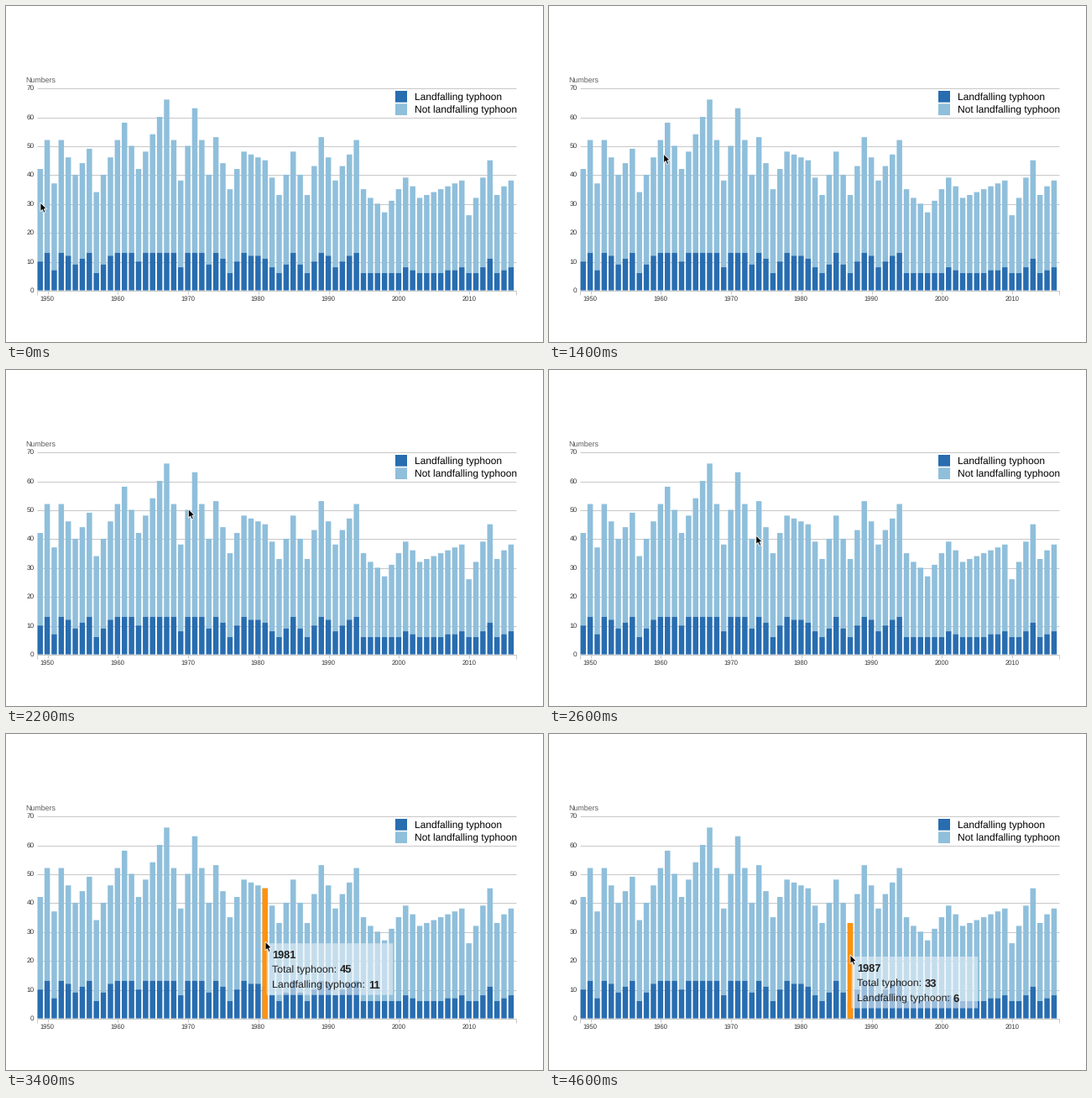
These frames come from a looping animation (640x400 px, 4800 ms). A matplotlib script:

```python
import matplotlib.pyplot as plt
import numpy as np
from matplotlib.animation import FuncAnimation
from matplotlib.patches import Polygon, Rectangle

W, H, DPI = 640, 400, 100
FRAMES, STEP_MS = 24, 200
DARK, LIGHT, HOT = "#286db0", "#8fbfdb", "#ff9210"
BASE, UNIT = 338.6, 3.443     # y of zero, pixels per typhoon
FIRST, LAST, PITCH, BAR = 1949, 2016, 8.376, 6.5

# Turning points of the yearly totals
turns = np.array([
    (1949, 42), (1950, 52), (1951, 37), (1952, 52), (1954, 40), (1956, 49),
    (1957, 34), (1961, 58), (1963, 42), (1967, 66), (1969, 38), (1971, 63),
    (1973, 40), (1974, 53), (1976, 35), (1978, 48), (1981, 45), (1983, 33),
    (1985, 48), (1987, 33), (1989, 53), (1991, 38), (1994, 52), (1995, 35),
    (1998, 27), (2001, 39), (2003, 32), (2009, 38), (2010, 26), (2013, 45),
    (2014, 33), (2016, 38)])
years = np.arange(FIRST, LAST + 1)
total = np.rint(np.interp(years, *turns.T)).astype(int)
# Landfalls rise with the total and level off at both ends
landed = np.clip(0.47 * total - 9.5, 6, 13).astype(int)

# Pointer waypoints: time in ms, x, y
path = np.array([
    (0, 41, 234), (400, 43, 235), (600, 53.8, 238), (800, 60, 239.5),
    (1800, 187.9, 134), (2600, 246.8, 197), (3000, 288.4, 246),
    (4000, 340, 249), (4200, 342.5, 252), (4600, 359, 263)])

plt.rcParams.update({"font.family": "Liberation Sans", "text.hinting": "none"})
fig = plt.figure(figsize=(W / DPI, H / DPI), dpi=DPI, facecolor="white")
ax = fig.add_axes([0, 0, 1, 1])
ax.set(xlim=(0, W), ylim=(H, 0))
ax.axis("off")


def year_x(year):
    return 49.1 + (year - 1950) * PITCH


def value_y(value):
    return BASE - value * UNIT


def label(x, y, text, px, **kw):
    kw.setdefault("color", "#222222")
    return ax.text(x, y, text, fontsize=px * 72 / DPI, va="baseline", **kw)


def rect(x, y, w, h, color, **kw):
    return ax.add_patch(
        Rectangle((x, y), w, h, fc=color, lw=0, snap=False, **kw))


def line(xs, ys, color="#c8c8c8"):
    ax.plot(xs, ys, color=color, lw=0.72, zorder=0, solid_capstyle="butt")


def draw_axes():
    label(23.5, 91, "Numbers", 8.9, color="#5c5c5c")
    for v in range(0, 71, 10):
        y = round(value_y(v) - 0.5) + 0.5
        line([36.5, 607.5], [y, y])
        label(33.7, y + 2.8, str(v), 8.3, ha="right", color="#333333")
    for x in (36.5, 607.5):
        line([x, x], [338.5, 343.5])
    for year in range(1950, 2011, 10):
        x = round(year_x(year) - 0.5) + 0.5
        line([x, x], [338.5, 342.5])
        label(year_x(year), 351, str(year), 7.6, ha="center", color="#333333")


def draw_legend():
    rows = [(101, DARK, "Landfalling typhoon"),
            (116.3, LIGHT, "Not landfalling typhoon")]
    for y, color, text in rows:
        rect(464, y, 14, 13.7, color)
        label(487, y + 11.3, text, 12, color="black")


def draw_bars():
    for year, t, n in zip(years, total, landed):
        x = year_x(year) - BAR / 2
        rect(x, value_y(t), BAR, (t - n) * UNIT, LIGHT)
        rect(x, value_y(n), BAR, n * UNIT, DARK)


draw_axes()
draw_legend()
draw_bars()

hot_bar = rect(0, 0, BAR, 1, HOT, zorder=3)
panel = rect(0, 0, 150.5, 61.5, "#e9f2f8", alpha=0.6, zorder=4)
title = label(0, 0, "", 12.7, weight="bold", zorder=5)
captions = [label(0, 0, s, 12.4, zorder=5)
            for s in ("Total typhoon:", "Landfalling typhoon:")]
numbers = [label(0, 0, "", 13, weight="bold", zorder=5) for _ in captions]
tip_parts = [hot_bar, panel, title, *captions, *numbers]

renderer = fig.canvas.get_renderer()
widths = [c.get_window_extent(renderer).width for c in captions]

arrow = np.array([(0, 0), (0, 10.6), (2.4, 8.4), (4.1, 12.2),
                  (6, 11.4), (4.3, 7.7), (7.5, 7.5)])
pointer = ax.add_patch(Polygon(arrow, fc="black", ec="white", lw=0.6, zorder=9))


def hovered(x, y):
    """Index of the bar under the pointer, or None."""
    i = round((x - year_x(FIRST)) / PITCH)
    inside = abs(x - year_x(FIRST + i)) <= BAR / 2
    return i if inside and y >= value_y(total[i]) else None


def update(frame):
    t = frame * STEP_MS
    x, y = (np.interp(t, path[:, 0], path[:, k]) for k in (1, 2))
    pointer.set_xy(arrow + (x, y))

    # Hovering starts with the first move
    i = hovered(x, y) if frame else None
    for part in tip_parts:
        part.set_visible(i is not None)
    if i is not None:
        hot_bar.set_xy((year_x(years[i]) - BAR / 2, value_y(total[i])))
        hot_bar.set_height(total[i] * UNIT)
        panel.set_xy((x + 1.6, y + 2))
        left = x + 8.2
        title.set_text(str(years[i]))
        title.set_position((left, y + 19.6))
        rows = zip(captions, numbers, widths, (total[i], landed[i]))
        for k, (caption, number, width, value) in enumerate(rows):
            base = y + 37.6 + 18 * k
            caption.set_position((left, base))
            number.set_text(str(value))
            number.set_position((left + width + 3.8, base))
    return [*tip_parts, pointer]


anim = FuncAnimation(fig, update, frames=FRAMES, interval=STEP_MS,
                     repeat=True, repeat_delay=0, blit=False)
plt.show()
```
